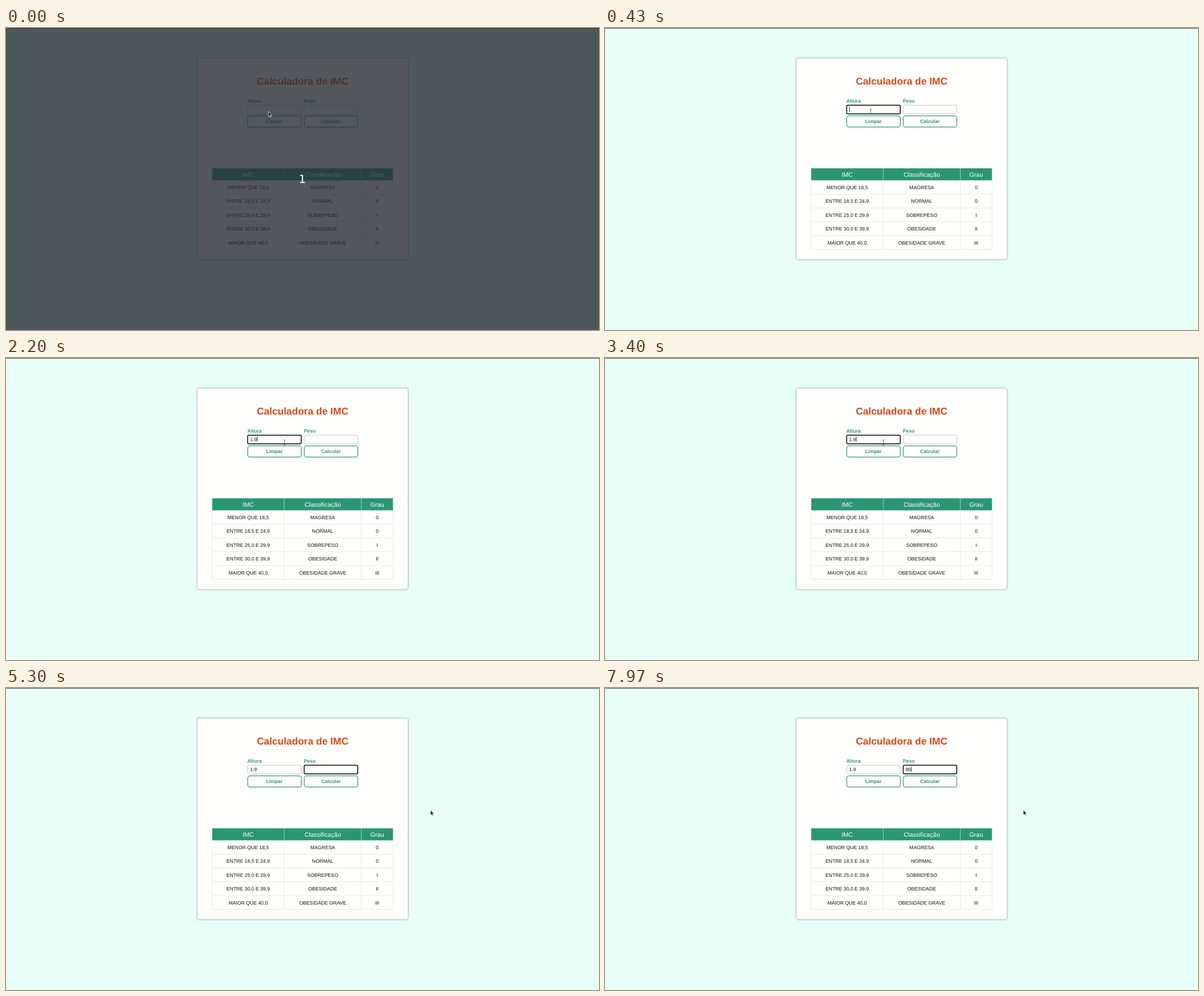
Write an HTML page that moves like this. It is 1049 by 534 pixels and loops after 8000 ms.

```html
<!DOCTYPE html>
<html lang="pt">
<head>
<meta charset="utf-8">
<title>Calculadora de IMC</title>
<style>
  html, body { margin: 0; width: 100%; height: 100%; overflow: hidden; background: #e8fff8; }
  svg { display: block; }
  text { font-family: "Liberation Sans", Arial, sans-serif; text-rendering: geometricPrecision; white-space: pre; }
  .card { fill: #fffffe; stroke: #c8cccb; stroke-width: .6; filter: drop-shadow(0 0 1.4px rgba(0, 0, 0, .4)); }
  .button { fill: #fffffe; stroke: #2a9674; stroke-width: 1.2; }
</style>
</head>
<body>
<svg width="1049" height="534" viewBox="0 0 1049 534">
  <rect width="1049" height="534" fill="#e8fff8"/>
  <rect width="1049" height="1" fill="#424847"/>
  <rect class="card" x="338.6" y="53.6" width="372.4" height="355.4" rx="3"/>
  <g id="page"></g>
  <g id="countdown">
    <rect width="1049" height="534" fill="rgb(40,45,51)" opacity=".8"/>
    <text x="524" y="274.3" text-anchor="middle" fill="#fff" style="font: 20px 'DejaVu Sans', sans-serif">1</text>
  </g>
  <path id="arrow" d="M0 0V9.3L2.2 7.3 3.6 10.5 5 9.9 3.6 6.8H6.4Z" fill="#222" stroke="#fff" stroke-width=".7"/>
  <path id="beam" d="M-2-4.5H-.5L0-4 .5-4.5H2M0-4V4M-2 4.5H-.5L0 4 .5 4.5H2" fill="none" stroke="#555" stroke-width=".9"/>
</svg>
<script>
(() => {
  const LOOP = 8000, EM = 8.74, GREEN = '#2a9674';
  const [page, countdown, arrow, beam] =
    ['page', 'countdown', 'arrow', 'beam'].map(id => document.getElementById(id));

  function add(tag, attrs, content = '') {
    const node = document.createElementNS('http://www.w3.org/2000/svg', tag);
    for (const key in attrs) node.setAttribute(key, attrs[key]);
    node.textContent = content;
    return page.appendChild(node);
  }
  const label = (x, y, content, size = EM, fill = '#111', weight = 400, anchor = 'middle') =>
    add('text', { x, y, fill, 'font-size': size, 'font-weight': weight, 'text-anchor': anchor }, content);
  const line = (d, stroke) => add('path', { d, stroke, 'stroke-width': .8, fill: 'none' });

  // Form
  label(524.7, 99.8, 'Calculadora de IMC', 17.48, '#e04614', 700);
  const fields = [['Altura', 'Limpar', 427], ['Peso', 'Calcular', 527]].map(([name, action, x]) => {
    label(x, 131.8, name, EM, GREEN, 700, 'start');
    const box = add('rect', { x: x + .5, y: 136.4, width: 94.8, height: 15.4, rx: 2, fill: '#fffffe' });
    add('rect', { class: 'button', x: x + .6, y: 155.4, width: 94.8, height: 19.8, rx: 4 });
    label(x + 47.8, 168, action, EM, GREEN, 700);
    const value = label(x + 4.7, 146.9, '', EM, '#111', 400, 'start');
    const caret = add('rect', { y: 139, width: .8, height: 9, fill: '#111' });
    return { x: x + 5, box, value, caret };
  });

  // Table
  const columns = [428.4, 560.3, 656.6], bodyTop = 269.6, rowHeight = 24.36;
  add('rect', { x: 364.8, y: 248, width: 320, height: 21.6, fill: GREEN });
  ['IMC', 'Classificação', 'Grau'].forEach((head, i) => label(columns[i], 262.7, head, 10.93, '#fff'));
  [
    ['MENOR QUE 18,5', 'MAGRESA', '0'],
    ['ENTRE 18,5 E 24,9', 'NORMAL', '0'],
    ['ENTRE 25,0 E 29,9', 'SOBREPESO', 'I'],
    ['ENTRE 30,0 E 39,9', 'OBESIDADE', 'II'],
    ['MAIOR QUE 40,0', 'OBESIDADE GRAVE', 'III']
  ].forEach((row, r) => {
    row.forEach((cell, i) => label(columns[i], 285.1 + r * rowHeight, cell));
    line(`M364.5 ${bodyTop + (r + 1) * rowHeight}H685`, '#e2e2e2');
  });
  for (const x of [364.6, 492.2, 628.5, 684.8]) {
    line(`M${x} 247.8V${bodyTop}`, '#c5d8d1');
    line(`M${x} ${bodyTop}V391.5`, '#e2e2e2');
  }
  line(`M364.5 247.8H685M364.5 ${bodyTop}H685`, '#d3dfda');

  // Time, x, y of the pointer
  const path = [
    [0, 464.3, 147.3], [370, 464.3, 147.3], [670, 492.6, 149.4], [3800, 492.6, 149.4],
    [3900, 645.8, 202], [4000, 723, 214], [4100, 751, 216], [7969, 751, 216], [7970, 740, 215.5], [LOOP, 740, 215.5]
  ];
  function pointerAt(t) {
    const i = path.findIndex(p => p[0] > t), [a, b] = [path[i - 1], path[i]];
    const k = (t - a[0]) / (b[0] - a[0]);
    return [a[1] + (b[1] - a[1]) * k, a[2] + (b[2] - a[2]) * k];
  }

  // Time of each key and the value after it
  const typing = [
    [[1870, '1'], [1970, '1.'], [2200, '1.9']],
    [[7070, '8'], [7400, '80']]
  ];
  // The caret toggles at each of these times
  const blinks = [370, 930, 1530, 2800, 3400, 4100, 4700, 5300, 5930, 6500, 7070];
  const show = (node, on) => node.setAttribute('visibility', on ? 'visible' : 'hidden');

  function draw(t) {
    const focus = t < 370 ? -1 : t < 3500 ? 0 : 1;
    const caretOn = blinks.filter(b => b <= t).length % 2 === 1;
    fields.forEach(({ x, box, value, caret }, i) => {
      const focused = i === focus;
      const typed = typing[i].filter(key => key[0] <= t).pop()?.[1] ?? '';
      value.textContent = typed;
      box.setAttribute('stroke', focused ? '#000' : '#c6c6c6');
      box.setAttribute('stroke-width', focused ? 1.5 : 1);
      const width = [...typed].reduce((sum, c) => sum + (c === '.' ? .278 : .556), 0) * EM;
      caret.setAttribute('x', x + width);
      show(caret, focused && caretOn);
    });
    const [x, y] = pointerAt(t), starting = t < 30, inField = !starting && t < 3810;
    show(beam, inField);
    show(arrow, !inField);
    for (const node of [beam, arrow]) node.setAttribute('transform', `translate(${x} ${y})`);
    show(countdown, starting);
  }

  function tick() {
    draw(performance.now() % LOOP);
    requestAnimationFrame(tick);
  }
  tick();
})();
</script>
</body>
</html>
```
